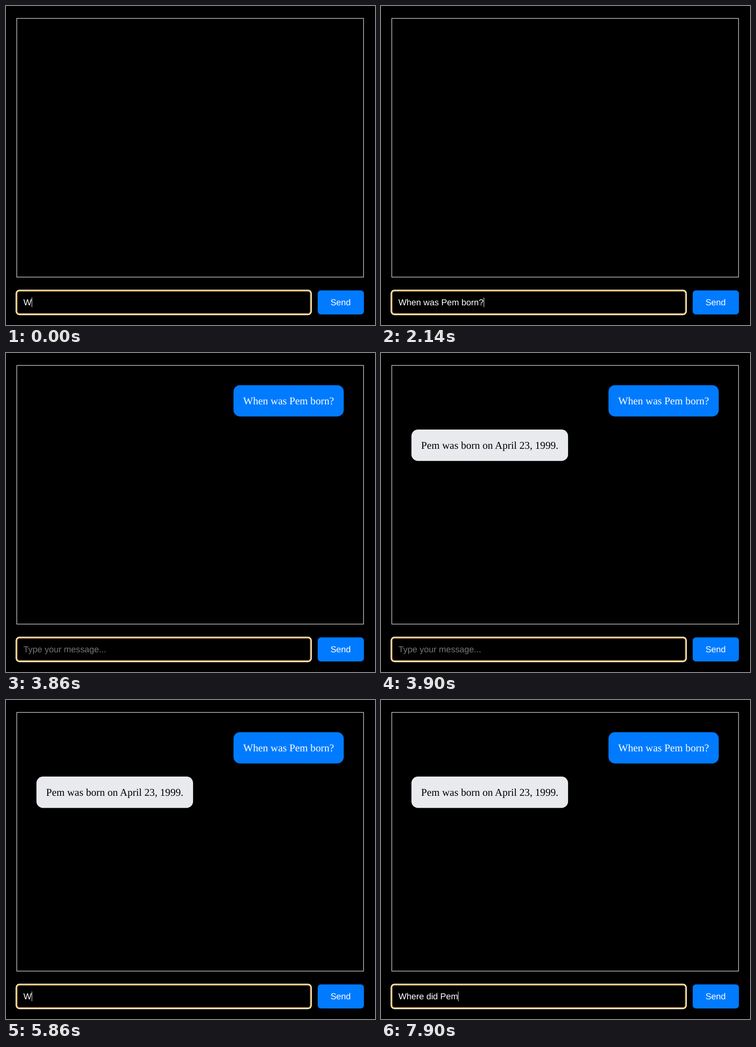
Recreate the animation shown at these times as an HTML page. Size 805 by 696 pixels, loop 8000 ms.

```html
<!DOCTYPE html>
<html lang="en">
<head>
<meta charset="utf-8">
<title>Chat</title>
<style>
  html, body { margin: 0; width: 100%; height: 100%; overflow: hidden; background: #000; }
  svg { display: block; width: 805px; height: 696px; }
  text { white-space: pre; text-rendering: geometricPrecision; }
  .ui { font: 18.9px "Liberation Sans", Arial, sans-serif; fill: #fff; }
  .msg { font: 22.65px "Liberation Serif", "Times New Roman", serif; }
  .line { fill: none; }
</style>
</head>
<body>
<svg viewBox="0 0 805 696">
  <rect width="805" height="696"/>
  <rect class="line" x="23.5" y="27.1" width="756.5" height="564.4" stroke="#ccc" stroke-width="1.4"/>

  <g id="question">
    <rect x="496.3" y="70.2" width="240.5" height="68.3" rx="14.2" fill="#007bff"/>
    <text class="msg" x="517.6" y="111.9" fill="#fff">When was Pem born?</text>
  </g>
  <g id="answer">
    <rect x="66.4" y="167" width="341.7" height="68.4" rx="14.2" fill="#e9eaed"/>
    <text class="msg" x="87.6" y="208.8" fill="#000">Pem was born on April 23, 1999.</text>
  </g>

  <rect class="line" x="22.3" y="620.3" width="643.6" height="52.8" rx="7" stroke="#fff6dd" stroke-width="2.6"/>
  <rect class="line" x="24.3" y="622.3" width="639.6" height="48.8" rx="5" stroke="#c4902c" stroke-width="1.7"/>
  <text id="hint" class="ui" x="38" y="653.2" style="fill:#757575">Type your message...</text>
  <text id="entry" class="ui" x="38" y="653.2"></text>
  <rect id="caret" y="636" width="1" height="21" fill="#fff"/>

  <rect x="680" y="620.4" width="100.8" height="52.6" rx="7.1" fill="#007bff"/>
  <text class="ui" x="730" y="653.2" text-anchor="middle">Send</text>
</svg>
<script>
const LOOP = 8000, SEND = 2380, REPLY = 3900, BLINK = 498;
const $ = id => document.getElementById(id);
const [question, answer, hint, entry, caret] =
  ['question', 'answer', 'hint', 'entry', 'caret'].map($);

// Each key is pressed at the matching time; "<" is backspace.
const first = {
  keys: 'When was Pem born?',
  times: [0, 100, 190, 290, 380, 480, 570, 670, 950, 1000, 1100, 1190, 1330,
    1570, 1670, 1810, 1950, 2140]
};
const second = {
  keys: 'Where  <did Pem',
  times: [5860, 6000, 6050, 6140, 6190, 6330, 6520, 7050, 7190, 7290, 7330, 7430,
    7670, 7860, 7900]
};

function typed({ keys, times }, t) {
  let text = '', last = first.times.at(-1);
  times.forEach((at, i) => {
    if (t < at) return;
    text = keys[i] === '<' ? text.slice(0, -1) : text + keys[i];
    last = at;
  });
  return { text, last };
}

const show = (el, on) => el.setAttribute('visibility', on ? 'visible' : 'hidden');

function render(t) {
  const { text, last } = typed(t < SEND ? first : second, t);
  if (entry.textContent !== text) entry.textContent = text;
  const width = text ? entry.getComputedTextLength() : 0;
  caret.setAttribute('x', Math.floor(38.3 + width));
  // The caret restarts its blink on every key press.
  show(caret, Math.floor((t - last + 18) / BLINK) % 2 === 0);
  show(hint, !text);
  show(question, t >= SEND);
  show(answer, t >= REPLY);
}

const start = performance.now();
function tick(now) {
  render(Math.max(0, now - start) % LOOP);
  requestAnimationFrame(tick);
}
render(0);
requestAnimationFrame(tick);
</script>
</body>
</html>
```
